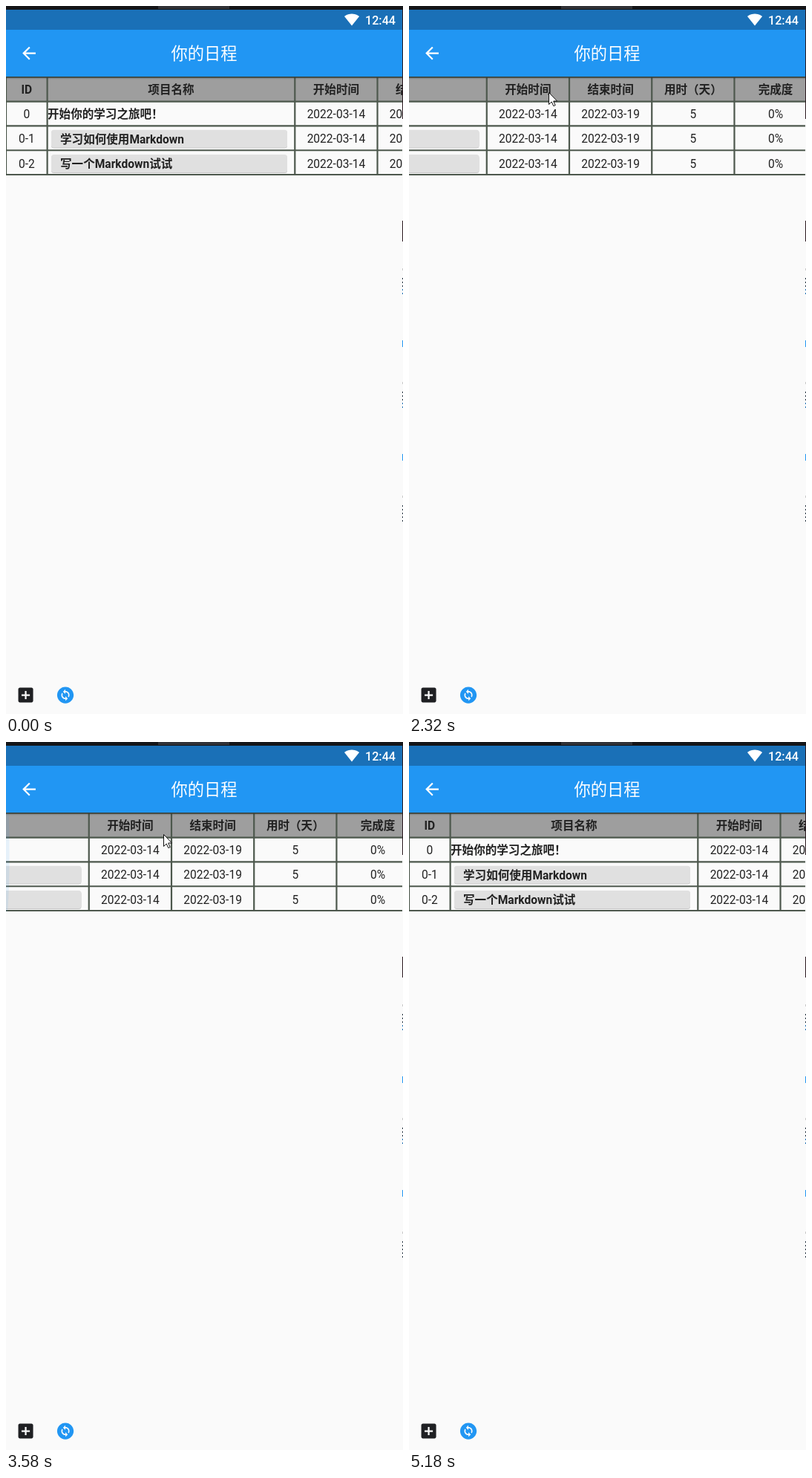
An HTML page that plays this animation: 535x953 px, repeating every 5.51 s.

```html
<!DOCTYPE html>
<html lang="zh-CN">
<head>
<meta charset="utf-8">
<title>日程</title>
<style>
  html, body { margin: 0; width: 100%; height: 100%; overflow: hidden; background: #fafafa; }
  svg { display: block; font: 15.57px Roboto, "Noto Sans CJK SC", "Noto Sans CJK", sans-serif; }
  .bold { font-weight: 700; }
  .mid { text-anchor: middle; }
</style>
</head>
<body>
<svg width="535" height="953" viewBox="0 0 535 953">
  <defs>
    <clipPath id="view"><rect y="94" width="534" height="134"/></clipPath>
    <linearGradient id="shade" x2="0" y2="1">
      <stop stop-opacity=".3"/><stop offset="1" stop-opacity="0"/>
    </linearGradient>
  </defs>
  <rect width="535" height="953" fill="#fafafa"/>
  <g clip-path="url(#view)">
    <g id="table" fill="#212121"></g>
    <ellipse id="glow" cy="150" ry="88" fill="#2196f3"/>
  </g>
  <rect y="95" width="534" height="4" fill="url(#shade)"/>
  <rect y="32" width="534" height="63" fill="#2196f3"/>
  <rect y="5" width="534" height="27" fill="#1a70b7"/>
  <rect width="535" height="5" fill="#141518"/>
  <rect x="205" width="96" height="4" fill="#303136"/>
  <g fill="#fff">
    <path transform="translate(455.7 8) scale(.86)" d="M12 21.5L23.64 7C23.2 6.66 18.7 3 12 3S.81 6.66.36 7Z"/>
    <text x="504.5" y="25" class="mid" font-size="16.2" font-weight="500">12:44</text>
    <path transform="translate(17.7 50.2) scale(1.1125)" d="M20 11H7.83l5.59-5.59L12 4l-8 8 8 8 1.41-1.41L7.83 13H20z"/>
    <text x="267" y="72" class="mid" font-size="22.25">你的日程</text>
  </g>
  <path transform="translate(13.2 914.2) scale(1.1125)" fill="#1f2023" d="M19 3H5c-1.11 0-2 .9-2 2v14c0 1.1.89 2 2 2h14c1.1 0 2-.9 2-2V5c0-1.1-.9-2-2-2zm-2 10h-4v4h-2v-4H7v-2h4V7h2v4h4z"/>
  <path transform="translate(66.7 914.2) scale(1.1125)" fill="#2196f3" d="M12 2C6.48 2 2 6.48 2 12s4.48 10 10 10 10-4.48 10-10S17.52 2 12 2zm.06 17v-2.01H12c-1.28 0-2.56-.49-3.54-1.46-1.71-1.71-1.92-4.35-.64-6.29l1.1 1.1c-.71 1.33-.53 3.01.59 4.13.7.7 1.62 1.03 2.54 1.01v-2.14l2.83 2.83L12.06 19zm4.11-4.24l-1.1-1.1c.71-1.33.53-3.01-.59-4.13C13.79 8.84 12.9 8.5 12 8.5h-.06v2.15L9.11 7.83 11.94 5v2.02c1.3-.02 2.61.45 3.6 1.45 1.7 1.7 1.91 4.35.63 6.29z"/>
  <path stroke="#2b1a20" d="M534.5 5V152M534.5 289V317"/>
  <g id="sliver"></g>
  <path id="cursor" fill="#fff" stroke="#111" d="M.5 .5V16.5L4.2 13L6.8 18.6L9.2 17.6L6.7 12H11.6Z"/>
</svg>
<script>
const $ = id => document.getElementById(id);
const LOOP = 5510, STEP = 66.39, UNIT = 1.1123;
const TOP = 95.7, ROW = 32.85, MAX_SCROLL = 354;

function add(parent, tag, attrs, text) {
  const el = document.createElementNS('http://www.w3.org/2000/svg', tag);
  for (const k in attrs) el.setAttribute(k, attrs[k]);
  if (text) el.textContent = text;
  $(parent).append(el);
}

function buildTable() {
  const edges = [0, 50, 350, 450, 550, 650, 750, 800].map(v => v * UNIT);
  const width = edges[7], bottom = TOP + 4 * ROW;
  const days = ['2022-03-14', '2022-03-19', '5', '0%'];
  const rows = [
    ['ID', '项目名称', '开始时间', '结束时间', '用时（天）', '完成度', '操作'],
    ['0', '开始你的学习之旅吧！', ...days],
    ['0-1', '学习如何使用Markdown', ...days],
    ['0-2', '写一个Markdown试试', ...days]
  ];
  add('table', 'rect', { y: TOP, width, height: ROW, fill: '#9e9e9e' });
  rows.forEach((cells, r) => {
    const base = 117.7 + 33.3 * r, button = r > 1;
    if (button) {
      const box = { x: 61, width: 318, height: 24, rx: 3.5 };
      add('table', 'rect', { ...box, y: base - 16.7, fill: '#c4c4c4' });
      add('table', 'rect', { ...box, y: base - 17.6, fill: '#e0e0e0' });
    }
    cells.forEach((cell, c) => {
      const name = r > 0 && c === 1;
      add('table', 'text', {
        x: name ? (button ? 73 : 56) : (edges[c] + edges[c + 1]) / 2,
        y: name && button ? base + .7 : Math.round(base),
        class: (name ? '' : 'mid ') + (!r || name ? 'bold' : '')
      }, cell);
    });
  });
  add('table', 'path', {
    transform: 'translate(848.6 137) scale(1.1125)',
    d: 'M10 6L8.59 7.41 13.17 12l-4.58 4.59L10 18l6-6z'
  });
  let d = edges.map(x => `M${x} ${TOP}V${bottom}`).join('');
  for (let r = 0; r < 5; r++) d += `M0 ${TOP + ROW * r}H${width}`;
  add('table', 'path', { d, fill: 'none', stroke: '#4d584d', 'stroke-width': 2.2 });
}

// Edge of the neighbouring window: a list item repeats down the last pixel column.
function buildSliver() {
  const mark = (y, height, fill) => add('sliver', 'rect', { x: 534, y, width: 1, height, fill });
  for (let i = 0; i < 3; i++) {
    const y = 366 + 153 * i;
    mark(y - 13, 3, '#c8c8c8');
    for (let k = 0; k < 5; k++) mark(y + k * 5, 2, k > 2 && i < 2 ? '#2172b4' : '#24313f');
    if (i < 2) mark(y + 84, 9, '#2196f3');
  }
}

// Turning points of the pointer: step, x, y
const TURNS = [
  [2, 499, 904], [10, 287, 106], [13, 305, 119], [15, 320, 113], [17, 320, 113],
  [21, 35, 107], [23, 35, 107], [27, 473, 138], [32, 180, 120], [33, 179, 115],
  [34, 179, 115], [43, 493, 139], [52, 136, 120], [58.5, 490, 139], [67, 136, 121],
  [74, 490, 139], [77, 523, 930]
];
const DRAG = { from: 27, to: 74 };
const FLICK = { from: 43, to: 52, gain: 1.33 };
const GLOWS = [{ at: 43, width: 14.4, alpha: .3 }, { at: 59, width: 18, alpha: .09 }];

function pointer(n) {
  const i = Math.max(1, TURNS.findIndex(k => k[0] >= n));
  const [a, x0, y0] = TURNS[i - 1], [b, x1, y1] = TURNS[i];
  const p = (1 - Math.cos(Math.PI * (n - a) / (b - a))) / 2;
  return { x: x0 + (x1 - x0) * p, y: y0 + (y1 - y0) * p };
}

// The table follows the held pointer between its two ends; a flick runs ahead of it.
function scrollAt(n) {
  const half = .5;
  let off = 0;
  for (let s = DRAG.from + half; s <= Math.min(n, DRAG.to); s += half) {
    const gain = s > FLICK.from && s <= FLICK.to ? FLICK.gain : 1;
    off += (pointer(s).x - pointer(s - half).x) * gain;
    off = Math.min(0, Math.max(-MAX_SCROLL, off));
  }
  return off;
}

function draw(now) {
  const n = Math.floor((now % LOOP) / STEP + .17);
  const shown = n >= 2 && n < 78;
  $('cursor').style.display = shown ? '' : 'none';
  if (shown) {
    const { x, y } = pointer(n);
    $('cursor').setAttribute('transform', `translate(${Math.round(x)} ${Math.round(y)})`);
  }
  $('table').setAttribute('transform', `translate(${shown ? scrollAt(n) : 0} 0)`);

  let rx = 0, opacity = 0;
  for (const { at, width, alpha } of GLOWS) {
    const fade = 1 - (n - at) / 16;
    if (n >= at && fade > 0) { rx = width * fade; opacity = alpha * fade; }
  }
  $('glow').setAttribute('rx', rx);
  $('glow').setAttribute('opacity', opacity);
}

buildTable();
buildSliver();
const begin = performance.now();
function tick() {
  draw(performance.now() - begin);
  requestAnimationFrame(tick);
}
tick();
</script>
</body>
</html>
```
